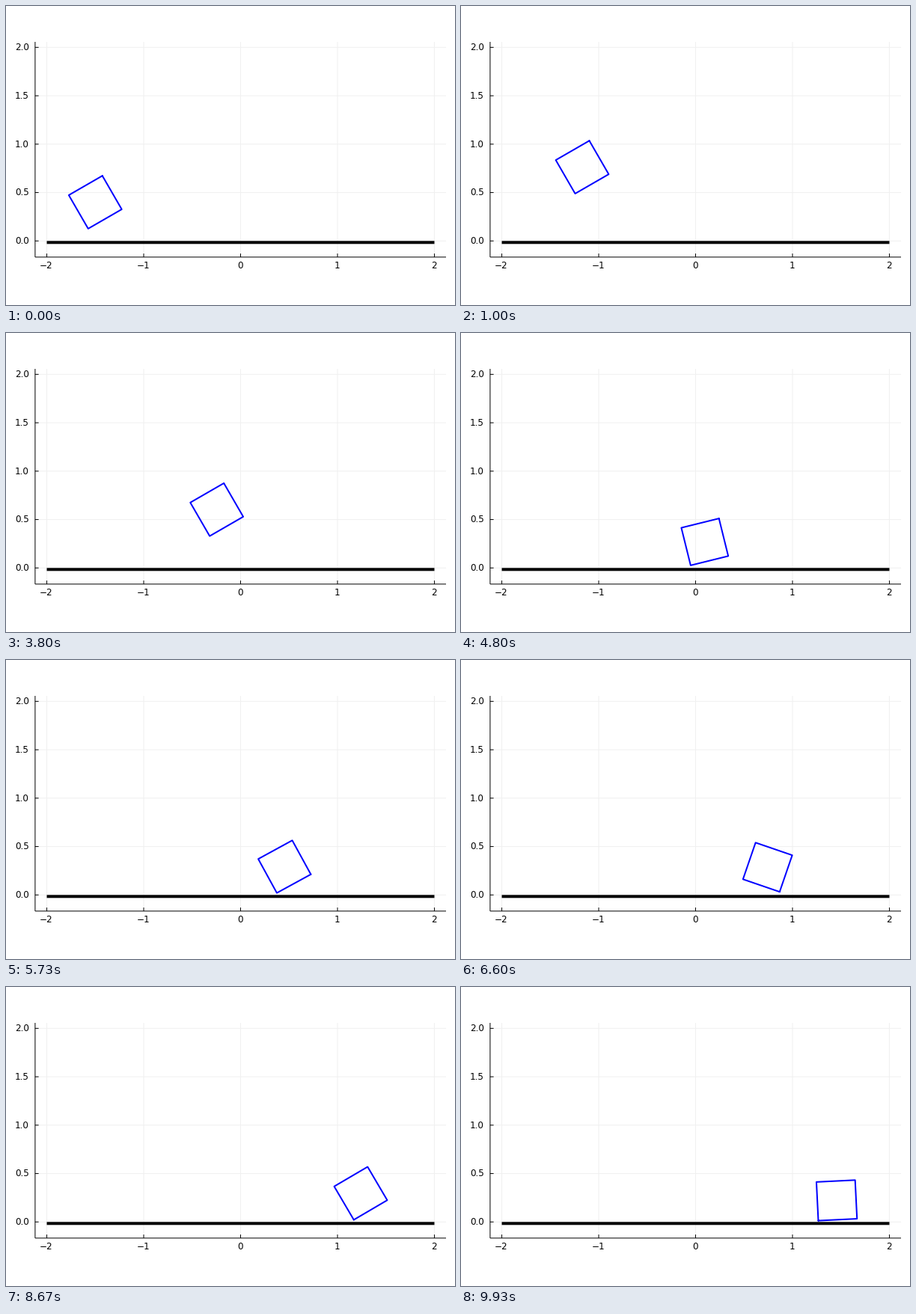
Recreate the animation shown at these times as a matplotlib script. Size 600 by 400 pixels, loop 9990 ms.

```python
import math

import numpy as np
import matplotlib.pyplot as plt
from matplotlib.animation import FuncAnimation

WIDTH, HEIGHT, DPI = 600, 400, 100
PX = 72 / DPI                      # one pixel in points
FRAMES, LOOP_MS = 150, 9990

# Plot layout in pixels
SCALE = 129.48                     # pixels per data unit
X0, Y0 = 313.5, 314.3              # data origin
LEFT, RIGHT, TOP, BOTTOM = 38.9, 588, 48, 335.9
TICK = 4.7

# Physics of the thrown square (unit mass)
STEP, GRAVITY = 0.01, 9.81
SIDE = 0.4
INERTIA = SIDE ** 2 / 6
RESTITUTION, FRICTION = 0.5, 0.3
SLOP = 0.004                       # penetration allowed before a bounce


def to_px(x, y):
    return X0 + SCALE * x, Y0 - SCALE * y


def corner_offsets(angle):
    a = angle + math.pi / 4 + np.arange(4) * math.pi / 2
    return SIDE / math.sqrt(2) * np.column_stack([np.cos(a), np.sin(a)])


def bounce(vel, arm):
    """Velocity after an impact at the contact arm, with Coulomb friction."""
    rx, ry = arm
    tangent = np.array([1, 0, -ry])
    normal = np.array([0, 1, rx])
    inv_mass = np.array([1, 1, 1 / INERTIA])
    free = vel - np.array([0, GRAVITY * STEP, 0])
    wanted = -RESTITUTION * (normal @ vel)

    jac = np.array([tangent, normal])
    jt, jn = np.linalg.solve(jac * inv_mass @ jac.T,
                             np.array([0, wanted]) - jac @ free)
    if abs(jt) > FRICTION * jn:
        push = normal + math.copysign(FRICTION, jt) * tangent
        jn = (wanted - normal @ free) / (normal @ (inv_mass * push))
        return free + inv_mass * push * jn
    return free + inv_mass * (jac.T @ np.array([jt, jn]))


def simulate():
    pose = np.array([-1.5, 0.4, math.radians(30)])
    vel = np.array([2.2, 3.2, 0.0])
    poses = [pose]
    for _ in range(FRAMES - 1):
        offsets = corner_offsets(pose[2])
        arm = offsets[offsets[:, 1].argmin()]
        gap = pose[1] + arm[1]
        falling = vel[1] + vel[2] * arm[0] < 0
        if gap < -SLOP and falling:
            vel = bounce(vel, arm)
        else:
            vel = vel - np.array([0, GRAVITY * STEP, 0])
        pose = pose + STEP * vel
        poses.append(pose)
    return poses


fig = plt.figure(figsize=(WIDTH / DPI, HEIGHT / DPI), dpi=DPI,
                 facecolor="white")
ax = fig.add_axes([0, 0, 1, 1])
ax.set_xlim(0, WIDTH)
ax.set_ylim(HEIGHT, 0)
ax.axis("off")


def line(xs, ys, color="black", width=1.0, **style):
    return ax.plot(xs, ys, color=color, lw=width * PX, snap=False,
                   solid_capstyle="butt", **style)[0]


def label(x, y, text, align):
    ax.text(x, y, text, ha=align, va="center", color="black",
            family="DejaVu Sans", size=12 * PX)


GRID = "#f0f0f0"
for value in range(-2, 3):
    x, _ = to_px(value, 0)
    line([x, x], [TOP, BOTTOM], GRID)
    line([x, x], [BOTTOM, BOTTOM - TICK], zorder=3)
    label(x - 0.5, 347.5, str(value).replace("-", "\u2212"), "center")

for value in np.arange(0, 2.1, 0.5):
    _, y = to_px(0, value)
    line([LEFT, RIGHT], [y, y], GRID)
    line([LEFT, LEFT + TICK], [y, y], zorder=3)
    label(31, y + 0.4, f"{value:.1f}", "right")

line([LEFT, LEFT], [TOP, BOTTOM], zorder=3)
line([LEFT, RIGHT], [BOTTOM, BOTTOM], zorder=3)

ground_x, ground_y = to_px(np.array([-2, 2]), np.full(2, -0.0155))
line(ground_x, ground_y, width=4, zorder=4)

square = line([], [], "blue", 2, zorder=5, solid_joinstyle="round")
square.set_solid_capstyle("round")

poses = simulate()


def draw(i):
    x, y, angle = poses[i]
    points = corner_offsets(angle) + (x, y)
    points = np.vstack([points, points[:1]])
    square.set_data(*to_px(points[:, 0], points[:, 1]))
    return (square,)


anim = FuncAnimation(fig, draw, frames=FRAMES, interval=LOOP_MS / FRAMES,
                     init_func=lambda: draw(0), repeat=True, repeat_delay=0)
plt.show()
```
